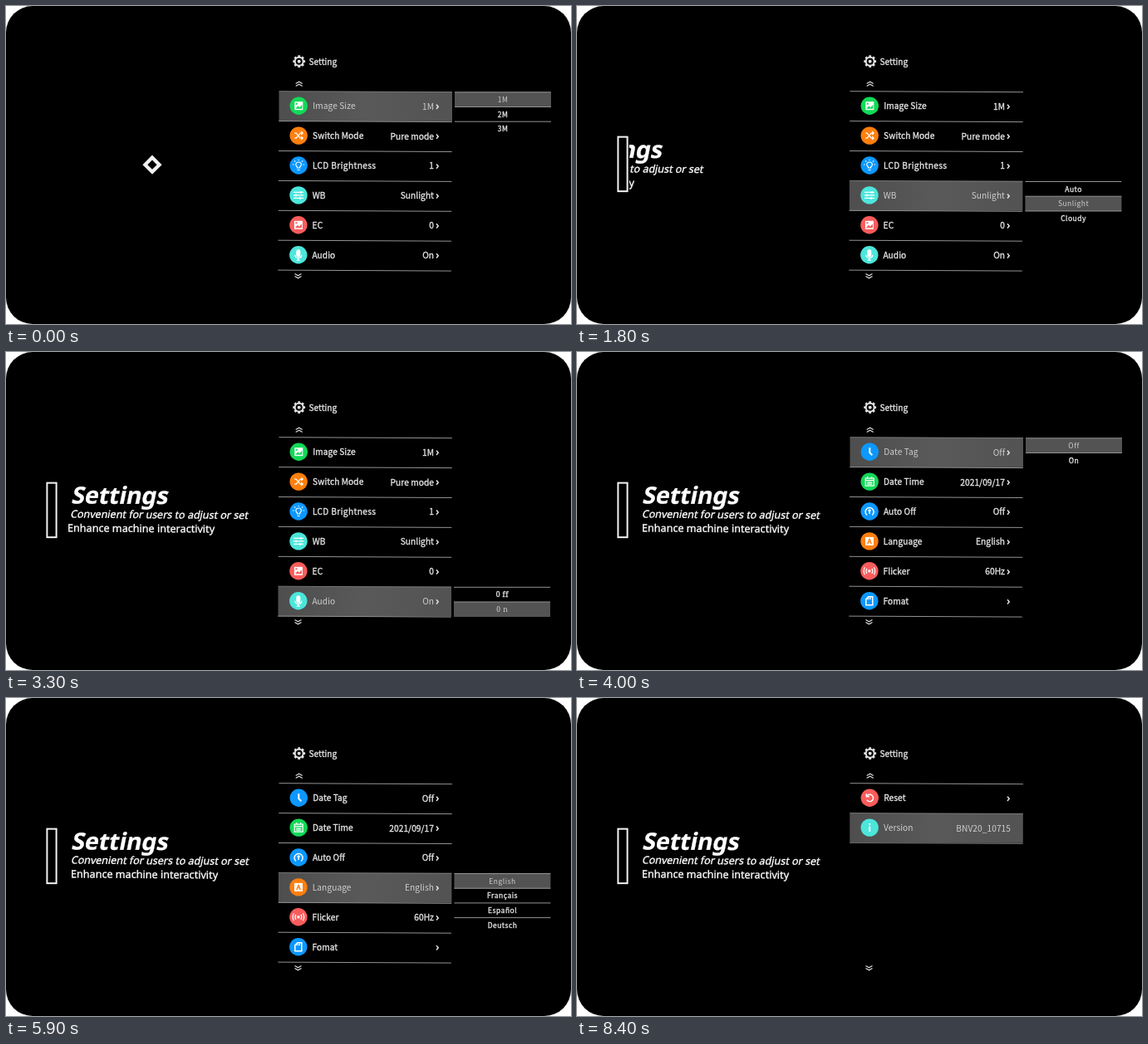
An HTML page with a canvas for the animation above (8500 ms loop, 680x383 px).

```html
<!DOCTYPE html>
<html lang="en">
<head>
<meta charset="utf-8">
<title>Settings menu</title>
<style>
  html, body { margin: 0; width: 100%; height: 100%; overflow: hidden; background: #fff; }
  canvas { display: block; width: 680px; height: 383px; }
</style>
</head>
<body>
<canvas id="stage"></canvas>
<script>
const LOOP = 8500, STEP = 607, LEAD = 45;
const W = 680, H = 383, ROW = 35.9, TOP = 103, PER_PAGE = 6;
const MENU_FONT = '"Noto Sans CJK SC", "Noto Sans CJK", "Noto Sans", sans-serif';
const TITLE_FONT = '"Noto Sans", "Open Sans", sans-serif';
const MONO = '"DejaVu Sans Mono", monospace';
const GREEN = '#12d958', ORANGE = '#ff7f0e', BLUE = '#0c98ff', CYAN = '#4ce6dc', RED = '#f95c5c';
const INK = '#e2e2e2', DIM = '#cecece';

const canvas = document.getElementById('stage');
const ratio = window.devicePixelRatio || 1;
canvas.width = W * ratio;
canvas.height = H * ratio;
const c = canvas.getContext('2d');

// Icons are centred on 0,0: s = stroked path, f = filled path, k = path in the disc colour.
const icons = {
  picture: { f: 'M-5-5H5V5H-5Z', k: 'M-4 3.5L-1 0L1 2L4-1.5V3.5ZM-3.5-3.5h2v2h-2z' },
  shuffle: { s: 'M-5-3H-3L2 3H5M-5 3H-3L2-3H5M3-5L5-3L3-1M3 1L5 3L3 5' },
  bulb: { s: 'M-1.5 3V2C-5-1-3-4 0-4S5-1 1.5 2V3ZM-1.5 5.5H1.5M0-7V-6M-7-1H-5.5M5.5-1H7M-5-5.5L-4-4.5M5-5.5L4-4.5' },
  sliders: { s: 'M-6-3.5H6M-6 0H6M-6 3.5H6M3-5V-2M-3-1.5V1.5M2 2V5' },
  mic: { f: 'M-2.5-4A2.5 2.5 0 0 1 2.5-4V0A2.5 2.5 0 0 1-2.5 0Z', s: 'M-4 0C-4 5 4 5 4 0M0 4V6.5M-2 6.5H2' },
  clock: { s: 'M0-5V1L3 4', w: 2 },
  calendar: { s: 'M-5-4H5V5H-5ZM-5-1.5H5M-2.5-6V-4M2.5-6V-4M-3 1H3M-3 3H3' },
  dial: { s: 'M-3 4.5A5 5 0 1 1 3 4.5M0-2V3M-1.5-.5L0-2L1.5-.5', w: 1.5 },
  letter: { f: 'M-5-5H5V5H-5Z', a: 'A' },
  waves: { s: 'M-3-3Q-5 0-3 3M-5.5-4.5Q-8 0-5.5 4.5M3-3Q5 0 3 3M5.5-4.5Q8 0 5.5 4.5', f: 'M-1.5-1.5h3v3h-3z' },
  card: { s: 'M-4-2L-1-5H4V5H-4ZM-1.5-4V-1.5M1-4V-1.5', w: 1.5 },
  reset: { s: 'M-3.5-2A4.2 4.2 0 1 1-3.5 2.5M-4-5V-1.5H-.5', w: 1.4 },
  info: { f: 'M-1-5h2v2h-2zM-1-1.5h2V5h-2z' }
};
const list = (options, chosen = 0, extra = {}) => ({ options, chosen, ...extra });
const items = [
  ['Image Size', '1M', GREEN, 'picture', list(['1M', '2M', '3M'])],
  ['Switch Mode', 'Pure mode', ORANGE, 'shuffle', list(['Game mode', 'Pro mode', 'Pure mode'], 2)],
  ['LCD Brightness', '1', BLUE, 'bulb', list(['1', '2', '3', '4', '5'])],
  ['WB', 'Sunlight', CYAN, 'sliders', list(['Auto', 'Sunlight', 'Cloudy'], 1)],
  ['EC', '0', RED, 'picture', list(['2', '1', '0', '−1', '−2'], 2)],
  ['Audio', 'On', CYAN, 'mic', list(['0 ff', '0 n'], 1, { serif: true })],
  ['Date Tag', 'Off', BLUE, 'clock', list(['Off', 'On'])],
  ['Date Time', '2021/09/17', GREEN, 'calendar', { date: true }],
  ['Auto Off', 'Off', BLUE, 'dial', list(['Off', '1 Min', '3 Min'])],
  ['Language', 'English', ORANGE, 'letter', list(['English', 'Français', 'Español', 'Deutsch'])],
  ['Flicker', '60Hz', RED, 'waves', list(['50Hz', '60Hz'], 1)],
  ['Fomat', '', BLUE, 'card', { question: 'Format the TF card?' }],
  ['Reset', '', RED, 'reset', { question: 'Reset settings?' }],
  ['Version', 'BNV20_10715', CYAN, 'info', null]
];
const captions = [
  { words: 'Settings', font: `700 28.3px ${TITLE_FONT}`, slant: .2, y: 182.4, travel: 131, from: 1617, to: 3300 },
  { words: 'Convenient for users to adjust or set', font: `12.5px ${TITLE_FONT}`, slant: .2, y: 199.5, travel: 225, from: 1492, to: 3610 },
  { words: 'Enhance machine interactivity', font: `12.6px ${TITLE_FONT}`, slant: 0, y: 216.3, travel: 190, from: 1787, to: 3877 }
];

const progress = (t, from, to) => Math.min(1, Math.max(0, (t - from) / (to - from)));
const easeOut = p => 1 - (1 - p) ** 3;
const easeInOut = p => p * p * (3 - 2 * p);
const mix = (a, b, p) => a + (b - a) * p;

// A thin outline gives every text except dimmed text a medium weight.
function text(str, x, y, font, { color = INK, align = 'left', spacing = 0 } = {}) {
  c.font = font;
  c.textAlign = align;
  c.letterSpacing = spacing + 'px';
  c.fillStyle = c.strokeStyle = color;
  c.fillText(str, x, y);
  if (color === DIM) return;
  c.lineWidth = .35;
  c.lineJoin = 'round';
  c.strokeText(str, x, y);
  c.lineJoin = 'miter';
}
function line(x1, y1, x2, y2, color = '#949494') {
  stroke(`M${x1} ${y1}L${x2} ${y2}`, color, 1);
}
function stroke(path, color, width) {
  c.strokeStyle = color;
  c.lineWidth = width;
  c.stroke(new Path2D(path));
}
function fill(path, color) {
  c.fillStyle = color;
  c.fill(new Path2D(path));
}
function disc(radius, color) {
  c.fillStyle = color;
  c.beginPath();
  c.arc(0, 0, radius, 0, 7);
  c.fill();
}

function drawIcon(name, x, y, color) {
  const icon = icons[name];
  c.save();
  c.translate(x, y);
  disc(10.7, color);
  if (icon.f) fill(icon.f, '#fff');
  if (icon.k) fill(icon.k, color);
  if (icon.s) stroke(icon.s, '#fff', icon.w || 1.2);
  if (icon.a) text(icon.a, 0, 3, `700 8px ${MENU_FONT}`, { color, align: 'center' });
  c.restore();
}

function drawHeader() {
  c.save();
  c.translate(352.7, 66.7);
  disc(6, INK);
  for (let i = 0; i < 8; i++) {
    c.rotate(Math.PI / 4);
    c.fillRect(-1.4, -7.4, 2.8, 2.4);
  }
  disc(4, '#000');
  disc(2, INK);
  c.restore();
  text('Setting', 364.5, 70.5, `10.2px ${MENU_FONT}`);
  stroke('M348.7 93.5L352.7 91.3L356.7 93.5M348.7 96.5L352.7 94.3L356.7 96.5', '#ddd', 1.3);
  stroke('M347.5 322.5L351.5 324.7L355.5 322.5M347.5 325.5L351.5 327.7L355.5 325.5', '#ddd', 1.3);
}

function drawRow([label, value, color, icon], row, selected) {
  const y = TOP + ROW * row, mid = y + 17.4, left = 328.5 - row * .2, right = 537 - row * .2;
  if (selected) {
    const band = c.createLinearGradient(left, 0, right, 0);
    band.addColorStop(0, '#4e4e4e');
    band.addColorStop(.5, '#595959');
    band.addColorStop(1, '#535353');
    c.fillStyle = band;
    c.fillRect(left, y, right - left, ROW);
  }
  line(left, y - .3, right, y + .7, selected ? '#777' : undefined);
  drawIcon(icon, 352.3 - row * .1, mid - .2, color);
  const font = `10.2px ${MENU_FONT}`, tint = selected ? DIM : INK;
  text(label, 369.2 - row * .15, mid + 3.7, font, { color: tint, spacing: label.startsWith('LCD') ? .35 : .05 });
  const hasArrow = label !== 'Version';
  text(value, hasArrow ? 515 : 522, mid + 4.2, font, { color: tint, align: 'right', spacing: .05 });
  if (hasArrow) stroke(`M518 ${mid - 1.7}L520.2 ${mid + .9}L518 ${mid + 3.5}`, INK, 1.5);
}

function button(label, x, y, active) {
  if (active) {
    c.fillStyle = '#5b5b5b';
    c.fillRect(x - 15, y - 6.5, 30, 13);
  }
  text(label, x, y + 3, `8.2px ${MENU_FONT}`, { align: 'center', spacing: label === 'OK' ? .6 : .1 });
}

function drawPanel(panel, row) {
  if (!panel) return;
  const y = TOP + ROW * row + .8, left = 540 - row * .2, right = 656 - row * .2, mid = 598 - row * .15;
  if (panel.options) {
    panel.options.forEach((option, i) => {
      const top = y + i * 17.7, chosen = i === panel.chosen;
      if (chosen) {
        c.fillStyle = '#535353';
        c.fillRect(left, top, right - left, 18);
      }
      line(left, top, right, top);
      const font = `8.5px ${panel.serif ? '"Noto Serif", serif' : MENU_FONT}`;
      text(option, mid, top + 12, font, { color: chosen ? DIM : INK, align: 'center', spacing: .5 });
    });
  } else if (panel.date) {
    const digits = { align: 'center', spacing: 1 };
    line(537, y, right, y);
    text('2021-09-17', 598.5, y + 18.5, `8.8px ${MONO}`, digits);
    text('12-05-32', 598.5, y + 35.5, `8.8px ${MONO}`, digits);
    button('OK', 577, y + 53.5, true);
    button('Cancel', 618, y + 53.5, false);
  } else {
    const bottom = row === 5 ? y + ROW : y + 51;
    line(536, bottom, 654.5, bottom);
    text(panel.question, 597, bottom - 44.5, `8.5px ${MENU_FONT}`, { align: 'center', spacing: .1 });
    button('OK', 576.5, bottom - 19, false);
    button('Cancel', 617.5, bottom - 19, true);
  }
}

function drawMenu(t) {
  const current = Math.min(items.length - 1, Math.floor((t + LEAD) / STEP));
  const first = current - current % PER_PAGE;
  const page = items.slice(first, first + PER_PAGE);
  drawHeader();
  page.forEach((item, row) => drawRow(item, row, first + row === current));
  const end = TOP + ROW * page.length, shift = page.length * .2;
  line(328.5 - shift, end - .3, 537 - shift, end + .7, page.length < PER_PAGE ? '#666' : undefined);
  drawPanel(items[current][4], current - first);
}

function drawTitle(t) {
  const grow = easeOut(progress(t, 0, 800));
  const slide = easeInOut(progress(t, 1050, 1750));
  const x = mix(176, 55, slide);
  const w = mix(mix(12, 64.5, grow), 11.2, slide), h = mix(12, 65.5, grow);
  c.save();
  c.translate(x, mix(191.2, 190.4, slide));
  c.rotate(mix(Math.PI / 4, 0, grow));
  c.strokeStyle = '#f2f2f2';
  c.lineWidth = mix(4.2, 2, grow);
  c.strokeRect(-w / 2, -h / 2, w, h);
  c.restore();

  c.save();
  c.beginPath();
  c.rect(x + w / 2 + 2.2, 140, 320, 100);
  c.clip();
  for (const { words, font, slant, y, travel, from, to } of captions) {
    const p = progress(t, from, to);
    if (!p) continue;
    c.save();
    c.transform(1, .007, -slant, 1, 78 - travel * (1 - easeOut(p)), y);
    text(words, 0, 0, font, { color: '#fff' });
    c.restore();
  }
  c.restore();
}

function frame(now) {
  const t = now % LOOP;
  c.setTransform(ratio, 0, 0, ratio, 0, 0);
  c.fillStyle = '#fff';
  c.fillRect(0, 0, W, H);
  c.fillStyle = '#000';
  c.beginPath();
  c.roundRect(0, 0, W, H, 32);
  c.fill();
  drawTitle(t);
  drawMenu(t);
  requestAnimationFrame(frame);
}
frame(0);
</script>
</body>
</html>
```
